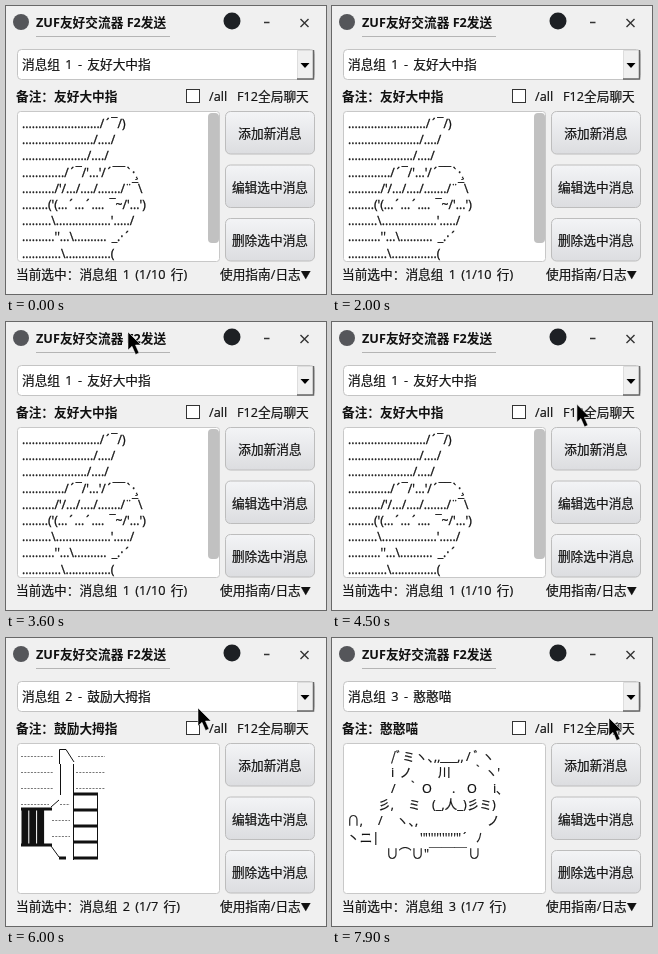
These frames come from a looping animation (320x288 px, 8000 ms). An HTML page:

```html
<!DOCTYPE html>
<html lang="zh-CN">
<head>
<meta charset="utf-8">
<style>
html, body { margin: 0; width: 100%; height: 100%; overflow: hidden; background: #f0f0f0; }
svg { display: block; width: 100vw; height: 100vh; }
text {
  font: 12.7px "Open Sans", "Noto Sans CJK SC", "Noto Sans CJK", sans-serif;
  fill: #111; stroke: #111; stroke-width: .2px; white-space: pre; word-spacing: 2px;
}
.bold { font-weight: 700; stroke: none; word-spacing: 0; }
.mid { text-anchor: middle; }
.small { font-size: 10px; }
#dots text { font-size: 12.2px; stroke-width: .3px; }
</style>
</head>
<body>
<svg viewBox="0 0 320 288">
  <defs>
    <linearGradient id="face" x2="0" y2="1">
      <stop stop-color="#f3f4f6"/><stop offset="1" stop-color="#dcdde0"/>
    </linearGradient>
    <clipPath id="inside"><rect x="12" y="106" width="201" height="149"/></clipPath>
  </defs>
  <rect width="320" height="288" fill="#f0f0f0"/>

  <!-- title bar -->
  <circle cx="15" cy="16" r="8" fill="#55565a"/>
  <text class="bold" x="30" y="21">ZUF友好交流器 F2发送</text>
  <path d="M30 30.5H164" stroke="#b4b4b4"/>
  <circle cx="226" cy="15" r="8.5" fill="#1d2024"/>
  <path d="M258 16.5h5.5M294.5 13l8 8m0-8l-8 8" stroke="#333" stroke-width="1.4"/>

  <!-- group selector -->
  <rect x="11.5" y="43.5" width="297" height="30" rx="4" fill="#fff" stroke="#c4c4c4"/>
  <rect x="291" y="44" width="17" height="29" fill="#f0f0f0"/>
  <path d="M291.5 73V44.5H307" fill="none" stroke="#ddd"/>
  <path d="M291 73H307.5V44" fill="none" stroke="#666" stroke-width="1.5"/>
  <path d="M294.5 57h9l-4.5 5z"/>
  <text id="selected" x="16" y="63"/>

  <text class="bold" id="note" x="10" y="95"/>
  <rect x="180.5" y="83.5" width="13" height="13" fill="#fff" stroke="#333"/>
  <text x="203" y="95">/all</text>
  <text x="231" y="95">F12全局聊天</text>

  <!-- message preview -->
  <rect x="11.5" y="105.5" width="202" height="150" rx="3" fill="#fff" stroke="#c8c8c8"/>
  <g clip-path="url(#inside)">
    <g id="dots"><rect x="202" y="107" width="11" height="130" rx="4" fill="#c1c1c1"/></g>
    <g id="thumb" fill="none" stroke="#111">
      <path stroke="#777" stroke-dasharray="2 1.3" d="M15 118.5H47M72 118.5H99M15 134.5H47M70 134.5H99M15 150.5H47M70 150.5H99M15 166.5H43M54 166.5H64M46 182.5H64M46 198.5H64"/>
      <path d="M53.5 126V111.5H60L68 124M54.5 126V157M67.5 126V222M91.5 156V220M45 169L53 162M45 208L53 219"/>
      <path stroke-width="3" d="M68 156H92M68 172H92M68 188H92M68 204H92M68 220H92M15 171H46M15 207H46M53 220H60"/>
      <path stroke-width="36" d="M15.5 189h6.8m1 0h6.8m1 0h7"/>
    </g>
    <g id="cat"/>
  </g>

  <g id="buttons"/>
  <text id="status" x="10" y="273"/>
  <text x="214" y="273">使用指南/日志<tspan class="small">▼</tspan></text>
  <path id="cursor" d="M0 0V18L4 14.3L7.6 22.5L11 21L7.5 13H13Z" stroke="#fff" stroke-width=".5"/>
</svg>
<script>
const LOOP = 8000;
const byId = id => document.getElementById(id);

function addText(parent, x, y, content, className = '') {
  const node = document.createElementNS('http://www.w3.org/2000/svg', 'text');
  node.setAttribute('x', x);
  node.setAttribute('y', y);
  node.setAttribute('class', className);
  node.textContent = content;
  parent.append(node);
}

const dotted = [
  [24, "/´¯/)"], [22, "/..../"], [20, "/..../"], [13, "/´¯/'...'/´¯¯`·¸"],
  [10, "/'/.../..../......./¨¯\\"], [8, "('(...´...´.... ¯~/'...')"],
  [9, "\\.................'...../"], [10, "''...\\.......... _.·´"],
  [12, "\\..............("]
];
dotted.forEach(([count, tail], row) =>
  addText(byId('dots'), 16, 122 + row * 16.2, '.'.repeat(count) + tail));

const catRows = [
  [[59, "/ﾞミヽ､,,___,,"], [134, "/ ﾞヽ"]],
  [[59, "i ノ"], [106, "川"], [140, "｀ヽ'"]],
  [[59, "/"], [75, "｀"], [90, "O"], [120, "."], [135, "O"], [161, "i､"]],
  [[46, "彡,"], [76, "ミ"], [100, "(_,人_)彡ミ)"]],
  [[15, "∩,"], [46, "/"], [64, "ヽ､,"], [155, "ノ"]],
  [[15, "丶ニ|"], [88, "'\"''''''''''\"´"], [144, "ﾉ"]],
  [[54, "∪⌒∪\""], [97, "￣￣￣"], [136, "∪"]]
];
catRows.forEach((row, i) =>
  row.forEach(([x, part]) => addText(byId('cat'), x, 123 + i * 16.1, part)));

['添加新消息', '编辑选中消息', '删除选中消息'].forEach((label, i) => {
  const y = 106 + i * 53.5;
  byId('buttons').insertAdjacentHTML('beforeend',
    `<rect x="219.5" y="${y - .5}" width="89" height="42.5" rx="5" fill="url(#face)" stroke="#bdbdbd"/>`);
  addText(byId('buttons'), 264, y + 26, label, 'mid');
});

const groups = [
  { start: 0, art: 'dots', name: '友好大中指', lines: 10 },
  { start: 5800, art: 'thumb', name: '鼓励大拇指', lines: 7 },
  { start: 7700, art: 'cat', name: '憨憨喵', lines: 7 }
];

// Pointer stops: time, x, y
const stops = [
  [3100, 70, 24], [3600, 122, 10], [3900, 130, 15], [4400, 236, 82],
  [4800, 292, 84], [5200, 268, 75], [5500, 296, 57], [5750, 230, 80],
  [6000, 192, 70], [6500, 110, 85], [7100, 224, 111], [7450, 293, 58],
  [7700, 265, 95], [7900, 277, 80], [8000, 277, 80]
];

function pointerAt(time) {
  const next = stops.findIndex(stop => stop[0] > time);
  const [t0, x0, y0] = stops[next - 1], [t1, x1, y1] = stops[next];
  const p = (time - t0) / (t1 - t0), eased = p * p * (3 - 2 * p);
  return [x0 + (x1 - x0) * eased, y0 + (y1 - y0) * eased];
}

let shown;
function showGroup(group) {
  if (group === shown) return;
  shown = group;
  const number = groups.indexOf(group) + 1;
  groups.forEach(({ art }) => byId(art).style.display = art === group.art ? '' : 'none');
  byId('selected').textContent = `消息组 ${number} - ${group.name}`;
  byId('note').textContent = `备注：${group.name}`;
  byId('status').textContent = `当前选中：消息组 ${number} (1/${group.lines} 行)`;
}

function draw(now) {
  const time = now % LOOP;
  showGroup(groups.findLast(group => time >= group.start));
  const visible = time >= stops[0][0];
  byId('cursor').style.display = visible ? '' : 'none';
  if (visible) byId('cursor').setAttribute('transform', `translate(${pointerAt(time)})`);
  requestAnimationFrame(() => draw(performance.now()));
}
draw(performance.now());
</script>
</body>
</html>
```
